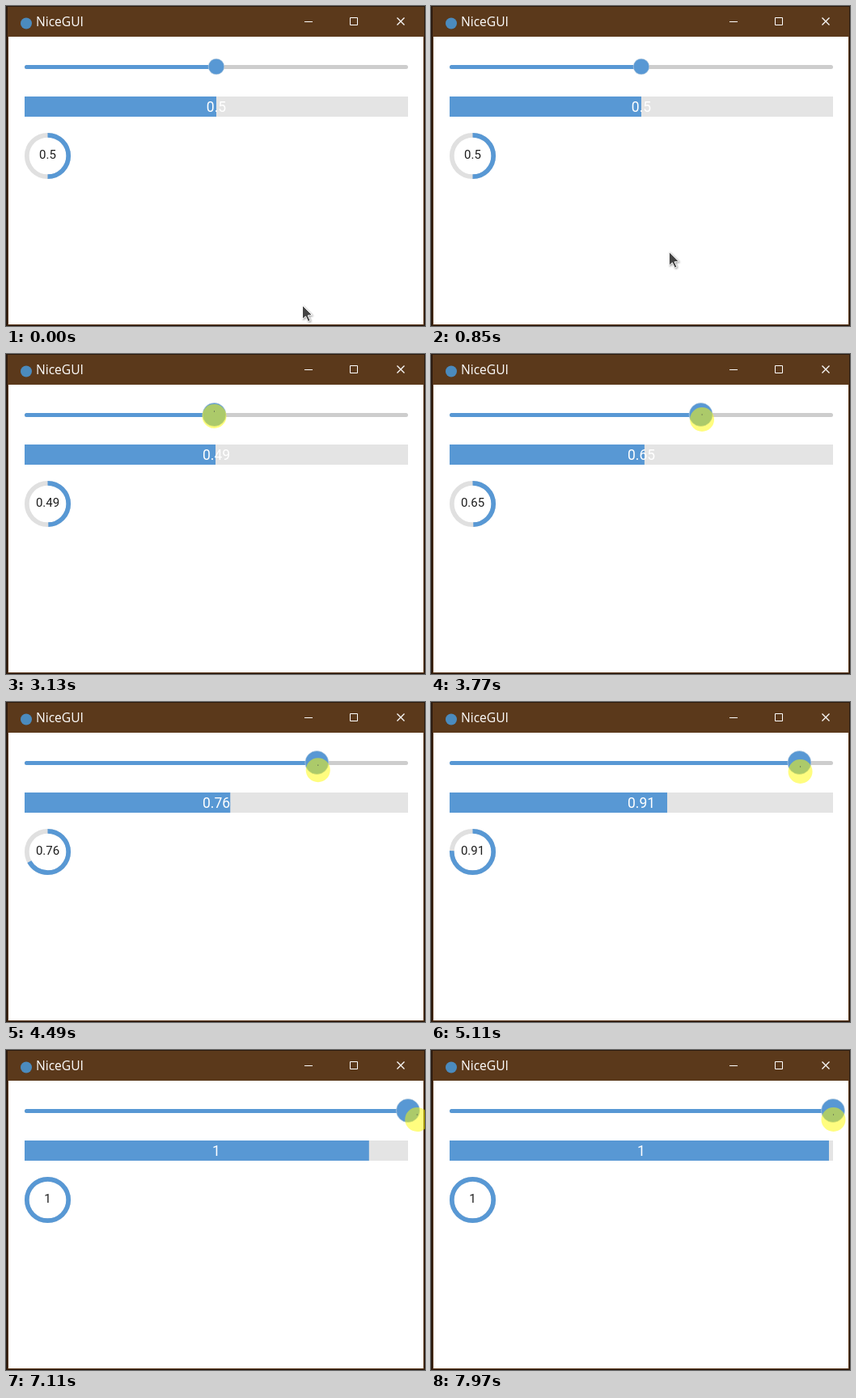
These frames come from a looping animation (518 by 396 pixels, 7990 ms). An HTML page:

```html
<!DOCTYPE html>
<html lang="en">
<head>
<meta charset="utf-8">
<title>NiceGUI</title>
<style>
  html, body { margin: 0; width: 100%; height: 100%; overflow: hidden; background: #fff; }
  svg { display: block; width: 518px; height: 396px; }
  .title { font: 500 15.6px "Open Sans", "Noto Sans", sans-serif; fill: #fff; }
  .value { font-family: Roboto, Arial, sans-serif; text-anchor: middle; }
  .blue { fill: #5898d4; }
  .line { fill: none; stroke: #fff; }
</style>
</head>
<body>
<svg viewBox="0 0 518 396">
  <rect width="518" height="396" fill="#2b1a0e"/>
  <rect x="2" y="1" width="515" height="394" fill="#5b391b"/>
  <rect x="3" y="38" width="513" height="356" fill="#fff"/>
  <circle cx="25" cy="21.5" r="7" fill="#4b8bbe"/>
  <text class="title" x="37" y="25">NiceGUI</text>
  <path class="line" d="M369 19.5h10M425.5 14.5h9v9h-9z"/>
  <path class="line" d="M483.5 14.5l9 9m0-9l-9 9" stroke-width="1.3"/>

  <rect x="23" y="73" width="474" height="5" rx="2.5" fill="#cdcdcd"/>
  <rect id="track" class="blue" x="23" y="73" height="5" rx="2.5"/>
  <circle id="thumb" class="blue" cy="75" stroke="#c4d3e0" stroke-width=".6"/>

  <rect x="23" y="112" width="474" height="25" fill="#e4e4e4"/>
  <rect id="bar" class="blue" x="23" y="112" height="25"/>
  <text id="barText" class="value" x="260" y="131" font-size="17.5" fill="#fff"></text>

  <g fill="none" stroke-width="5.7" transform="rotate(-90 51.5 185.5)">
    <circle cx="51.5" cy="185.5" r="25.7" stroke="#e0e0e0"/>
    <circle id="ring" cx="51.5" cy="185.5" r="25.7" stroke="#5898d4" pathLength="1"/>
  </g>
  <text id="ringText" class="value" x="51.5" y="189" font-size="15" fill="#1d1d1d"></text>

  <g id="press">
    <circle cy="6" r="15" fill="#fffb00" fill-opacity=".5"/>
    <rect x="-.5" y="-.5" width="1" height="1" fill="#444"/>
  </g>
  <path id="arrow" d="M.5 .5v17l4-3.5 3 6.5 2.7-1.2-3-6.3 5.3-.5z" fill="#444" stroke="#fff"
        style="filter: drop-shadow(1px 1px 1px #0006)"/>
</svg>
<script>
const LOOP = 7990, PRESS = 2450, LEFT = 23, WIDTH = 474;
const THUMB_LAG = 15, RING_LAG = 650;
const $ = id => document.getElementById(id);

// Key points: [time, x, y]
const pointer = [
  [0, 366, 370], [1250, 271, 254], [1400, 290, 230], [1560, 279, 182], [PRESS, 257.5, 71],
  [3200, 257.5, 71], [3770, 335, 75], [4450, 382, 78], [5110, 456.5, 80], [6230, 519, 80],
  [LOOP, 497.5, 80]
];
const barEnd = [[PRESS, 260], [3100, 259], [5110, 292], [6230, 347], [6860, 429], [LOOP, 492]];

// Smooth interpolation that never overshoots its keys
function at(keys, t, c = 1) {
  const last = keys.length - 1;
  if (t <= keys[0][0]) return keys[0][c];
  if (t >= keys[last][0]) return keys[last][c];
  const slope = i => (keys[i + 1][c] - keys[i][c]) / (keys[i + 1][0] - keys[i][0]);
  const tangent = i => {
    if (i === 0 || i === last) return 0;
    const a = slope(i - 1), b = slope(i);
    return a * b > 0 ? 2 * a * b / (a + b) : 0;
  };
  const i = keys.findIndex(k => k[0] > t) - 1;
  const span = keys[i + 1][0] - keys[i][0], u = (t - keys[i][0]) / span, v = 1 - u;
  return v * v * (1 + 2 * u) * keys[i][c] + u * u * (3 - 2 * u) * keys[i + 1][c]
    + span * u * v * (v * tangent(i) - u * tangent(i + 1));
}

// Slider level from 0 to 1; once it reaches the end it stays there
function level(t) {
  if (t < PRESS) return .5;
  return t > 6230 ? 1 : Math.min((at(pointer, t) - LEFT) / WIDTH, 1);
}

function set(id, attrs) {
  for (const name in attrs) $(id).setAttribute(name, attrs[name]);
}

function draw(t) {
  const pressed = t >= PRESS;
  const now = level(t - THUMB_LAG), ring = level(t - RING_LAG);
  const grow = Math.min(Math.max((t - PRESS) / 180, 0), 1);

  set("track", { width: now * WIDTH });
  set("thumb", { cx: LEFT + now * WIDTH, r: 9.8 + 4.7 * grow * (2 - grow) });
  set("bar", { width: at(barEnd, t) - LEFT });
  set("ring", { "stroke-dasharray": ring < 1 ? ring + " 2" : "none" });
  $("barText").textContent = $("ringText").textContent = Math.floor(now * 100 + 1e-6) / 100;

  const move = `translate(${at(pointer, t)} ${at(pointer, t, 2)})`;
  set("press", { transform: move, visibility: pressed ? "visible" : "hidden" });
  set("arrow", { transform: move, visibility: pressed ? "hidden" : "visible" });
}

const start = performance.now();
function frame(now) {
  draw(Math.max(now - start, 0) % LOOP);
  requestAnimationFrame(frame);
}
draw(0);
requestAnimationFrame(frame);
</script>
</body>
</html>
```
